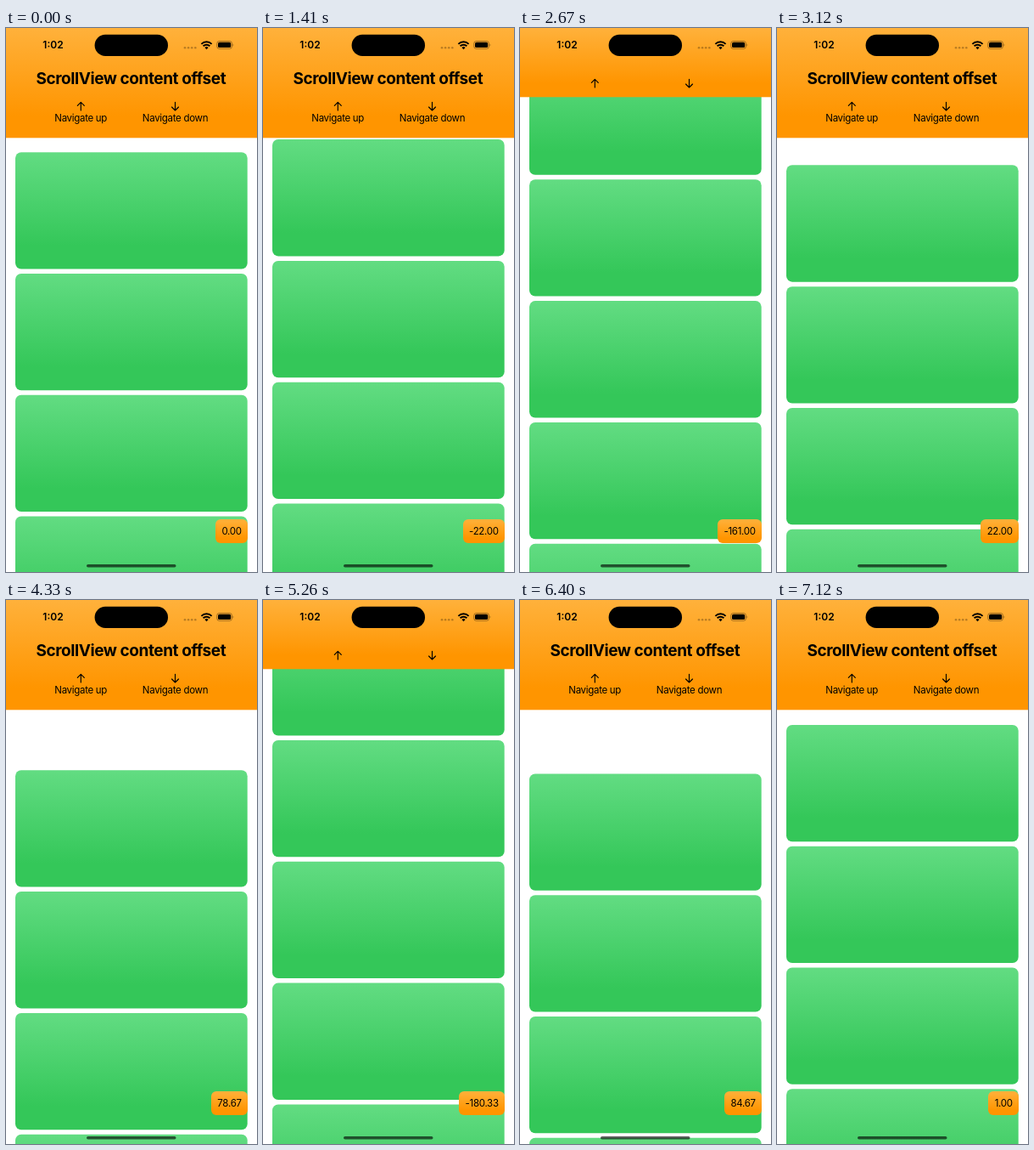
An HTML page for the animation above (7.24 s loop, 296 by 640 pixels).

```html
<!DOCTYPE html>
<html lang="en">
<head>
<meta charset="utf-8">
<title>ScrollView content offset</title>
<style>
  html, body { margin: 0; width: 100%; height: 100%; overflow: hidden; background: #fff; }
  body { position: relative; font-family: Inter, Roboto, sans-serif; color: #000; }
  svg { display: block; position: absolute; left: 0; top: 0; }
  text { text-anchor: middle; font-family: Inter, Roboto, sans-serif; }
  .title { font-size: 19px; font-weight: 700; letter-spacing: -.43px; }
  .clock { font-size: 12px; font-weight: 600; }
  .label, #badge { font-size: 11.5px; letter-spacing: -.3px; }
  .arrow { fill: none; stroke: #000; stroke-width: 1.15; stroke-linecap: round; stroke-linejoin: round; }
  #badge {
    position: absolute; right: 11.3px; top: 578px; height: 27.5px; line-height: 28px;
    padding: 0 7px 0 7.3px; border-radius: 6px; white-space: nowrap;
    background: linear-gradient(#ffb13b, #ff9500 80%);
  }
</style>
</head>
<body>
<svg width="296" height="640" viewBox="0 0 296 640">
  <defs>
    <linearGradient id="orange" x2="0" y2="1">
      <stop stop-color="#ffb13b"/><stop offset=".8" stop-color="#ff9500"/>
    </linearGradient>
    <linearGradient id="green" x2="0" y2="1">
      <stop stop-color="#62dc82"/><stop offset=".8" stop-color="#34c759"/>
    </linearGradient>
  </defs>

  <g id="cards" fill="url(#green)"></g>

  <rect id="header" width="296" height="129.3" fill="url(#orange)"/>
  <text id="title" class="title" x="147.3" y="65.8">ScrollView content offset</text>
  <g id="nav">
    <path class="arrow" d="M88.3 97V87.3M84.3 91.3l4-4 4 4"/>
    <path class="arrow" d="M199.5 87.3V97M195.5 93l4 4 4-4"/>
    <g id="labels" class="label">
      <text x="88.2" y="109.6">Navigate up</text>
      <text x="199.5" y="109.6">Navigate down</text>
    </g>
  </g>

  <text class="clock" x="55.5" y="24.4">1:02</text>
  <rect x="104.6" y="7.8" width="86.4" height="25.2" rx="12.6"/>
  <g opacity=".27">
    <circle cx="211" cy="23.2" r="1.3"/><circle cx="215.1" cy="23.2" r="1.3"/>
    <circle cx="219.2" cy="23.2" r="1.3"/><circle cx="223.3" cy="23.2" r="1.3"/>
  </g>
  <g fill="none" stroke="#000" stroke-width="1.9">
    <path d="M230.4 18.8a8.6 8.6 0 0 1 12.2 0"/>
    <path d="M232.6 21.3a5.6 5.6 0 0 1 7.8 0"/>
  </g>
  <path d="M236.5 25.2l-2.1-2.2a3 3 0 0 1 4.2 0z"/>
  <rect x="248.7" y="15.5" width="17.8" height="8.9" rx="2.8" fill="none" stroke="#000" stroke-width=".8" opacity=".45"/>
  <path d="M267.6 18.4q1.7 1.5 0 3.1z" opacity=".5"/>
  <rect x="250" y="16.8" width="15.2" height="6.3" rx="1.7"/>
</svg>
<div id="badge">0.00</div>
<svg width="296" height="640" viewBox="0 0 296 640">
  <rect x="95" y="630.9" width="105.5" height="3.5" rx="1.75" opacity=".62"/>
</svg>

<script>
const LOOP = 7240;
const SCALE = 0.6875; // pixels per point

// Bursts of screen updates: first, last, count
const BURSTS = [
  [0, 0, 1], [1300, 1930, 7], [2040, 2280, 3], [2450, 3120, 7], [3240, 3470, 3], [3620, 3620, 1],
  [4330, 5000, 7], [5130, 5260, 2], [5410, 6060, 7], [6170, 6400, 3], [6670, 7120, 5]
];
const ticks = BURSTS.flatMap(([first, last, count]) =>
  Array.from({ length: count }, (_, i) => first + (last - first) * i / Math.max(1, count - 1)));

// Finger drag: time, content offset in points
const DRAG = [
  [0, 0], [1200, 0], [2040, -194.33], [2280, -206], [3120, 22], [3470, 74], [3620, 81],
  [4220, 81], [4330, 78.67], [5260, -180.33], [6060, 24], [6400, 84.67], [6600, 84.67]
];
const RELEASE = 6600;

const $ = id => document.getElementById(id);
const smooth = x => { x = Math.min(1, Math.max(0, x)); return x * x * (3 - 2 * x); };

// Tangent is flat at turning points and rests
function slope(i) {
  const a = DRAG[i - 1], b = DRAG[i], c = DRAG[i + 1];
  if (!a || !c || (b[1] - a[1]) * (c[1] - b[1]) <= 0) return 0;
  return (c[1] - a[1]) / (c[0] - a[0]);
}

function dragOffset(t) {
  const i = Math.max(0, DRAG.findIndex(p => p[0] >= t) - 1);
  const [t0, v0] = DRAG[i], [t1, v1] = DRAG[i + 1];
  const span = t1 - t0, u = (t - t0) / span;
  return v0 + (v1 - v0) * u * u * (3 - 2 * u)
    + span * (slope(i) * u * (1 - u) ** 2 - slope(i + 1) * u * u * (1 - u));
}

function offsetAt(t) {
  if (t <= RELEASE) return dragOffset(t);
  const x = (t - RELEASE) * 0.0124;
  return DRAG[DRAG.length - 1][1] * (1 + x) * Math.exp(-x);
}

for (let i = 0; i < 6; i++) {
  const card = document.createElementNS("http://www.w3.org/2000/svg", "rect");
  const box = { x: 11, y: 146.2 + 142.8 * i, width: 273.7, height: 137.3, rx: 6.9 };
  for (const key in box) card.setAttribute(key, box[key]);
  $("cards").append(card);
}

function render(t) {
  const tick = ticks.filter(time => time <= t).pop();
  const offset = Math.round(offsetAt(tick) * 3) / 3;
  const collapse = smooth((-offset - 30) / 70);
  $("cards").setAttribute("transform", `translate(0 ${offset * SCALE})`);
  $("header").setAttribute("height", 129.3 - 48 * collapse);
  $("nav").setAttribute("transform", `translate(0 ${-27 * collapse})`);
  $("title").setAttribute("opacity", 1 - collapse);
  $("labels").setAttribute("opacity", 1 - collapse);
  $("badge").textContent = offset.toFixed(2);
}

const start = performance.now();
function frame() {
  render((performance.now() - start) % LOOP);
  requestAnimationFrame(frame);
}
frame();
</script>
</body>
</html>
```
